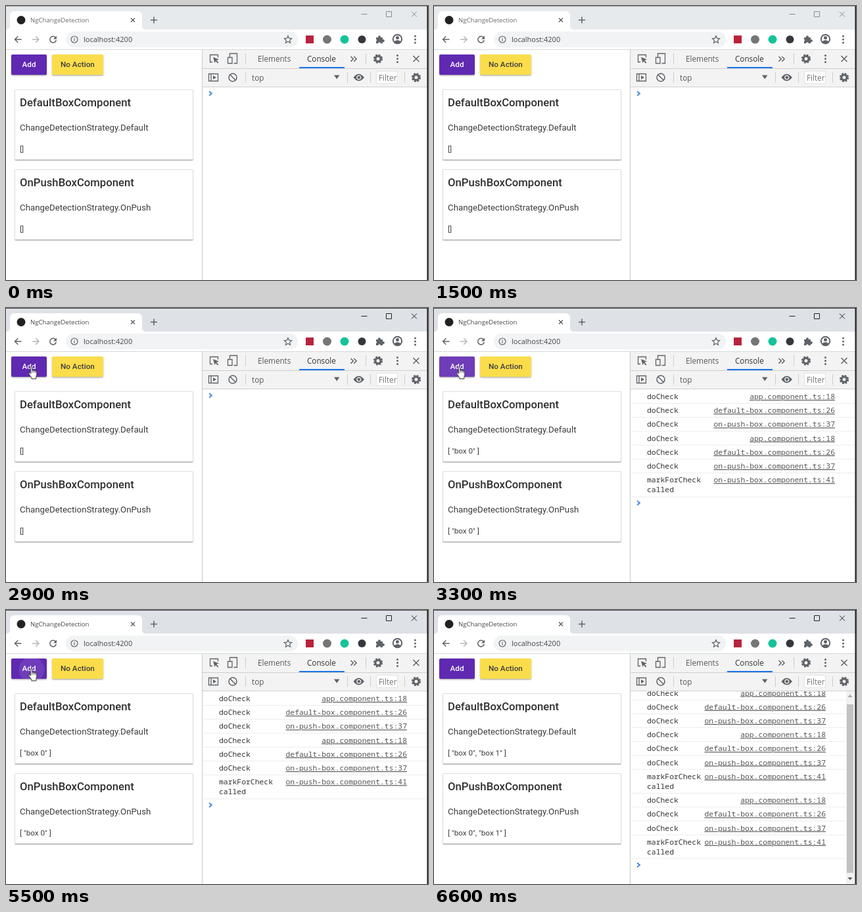
Animation of 642x418 px, one loop 6.7 s. Source, as an HTML page:

```html
<!DOCTYPE html>
<html lang="en">
<head>
<meta charset="utf-8">
<title>Change detection demo</title>
<style>
html, body { margin: 0; width: 642px; height: 418px; overflow: hidden; background: #fff; }
body { position: relative; }
svg { position: absolute; left: 0; top: 0; }
text { white-space: pre; }

.card, .btn { position: absolute; box-sizing: border-box; }
.card {
  left: 13px; width: 272px; height: 108px; background: #fff;
  border: 1px solid #dedede; border-bottom-color: #c4c4c4; border-radius: 2px;
  box-shadow: 0 1px 1px rgba(0,0,0,.28);
}
.btn {
  top: 74px; height: 31px; overflow: hidden; border-radius: 2px;
  box-shadow: 0 1.6px 1.6px rgba(0,0,0,.22), 0 .8px 3px rgba(0,0,0,.14);
}
.add { left: 8px; width: 54px; background: #6029b2; }
.noop { left: 70px; width: 78px; background: #fbdd4b; }
.ripple {
  position: absolute; left: -5px; top: -19px; width: 72px; height: 72px;
  border-radius: 50%; background: #fff; opacity: 0;
  animation: ripple 6.7s linear infinite;
}

.page { font-family: Roboto, sans-serif; fill: #3c3c3c; }
.head { font-size: 16.7px; font-weight: 500; fill: #303030; }
.body { font-size: 13.27px; }
.json { font-size: 11.7px; }
.label { font-size: 11.7px; font-weight: 500; }
.ui { font-family: "Open Sans", "Noto Sans", sans-serif; font-size: 11.7px; fill: #55585c; }
.mono { font-family: "Noto Sans Mono", "DejaVu Sans Mono", monospace; font-size: 11.4px; fill: #333; }
.link { text-anchor: end; text-decoration: underline; fill: #555; }
.icon { fill: none; stroke: #5f6368; stroke-width: 1.5; }
.solid { fill: #5f6368; }
.sep { stroke: #ccc; }

.strip, .frame, .controls, .tab, .none, .one, .from1, .two, .list, .link, .prompt, .cursor {
  animation: 6.7s step-end infinite;
}
.strip { animation-name: strip; }
.frame { animation-name: frame; }
.controls { animation-name: controls; }
.tab { animation-name: tab; }
.none { animation-name: none-yet; }
.one { animation-name: one-box; }
.from1 { animation-name: from1; }
.two { animation-name: from2; }
.list { animation-name: scroll; }
.link { animation-name: narrow; }
.prompt { animation-name: prompt; }
.cursor { animation-name: cursor; }

@keyframes strip { 0% { fill: #e7eaed; } 43.2%, 100% { fill: #dee1e6; } }
@keyframes frame { 0% { fill: #a2a4a7; } 43.2%, 100% { fill: #4a4c4f; } }
@keyframes controls { 0% { stroke: #898b8f; } 43.2%, 100% { stroke: #222; } }
@keyframes tab { 0% { fill: #686b70; } 43.2%, 100% { fill: #45484c; } }
@keyframes none-yet { 0% { visibility: visible; } 46.2%, 100% { visibility: hidden; } }
@keyframes one-box { 0% { visibility: hidden; } 46.2% { visibility: visible; } 83.5%, 100% { visibility: hidden; } }
@keyframes from1 { 0% { visibility: hidden; } 46.2%, 100% { visibility: visible; } }
@keyframes from2 { 0% { visibility: hidden; } 83.5%, 100% { visibility: visible; } }
@keyframes scroll { 0% { transform: none; } 83.5%, 100% { transform: translateY(-8.5px); } }
@keyframes narrow { 0% { transform: none; } 83.5%, 100% { transform: translateX(-14px); } }
@keyframes prompt {
  0% { transform: translateY(133.5px); }
  46.2% { transform: translateY(297.5px); }
  83.5%, 100% { transform: translateY(397.5px); }
}
@keyframes cursor {
  0% { visibility: hidden; transform: translate(19px, 99px); }
  25.3% { visibility: visible; transform: translate(19px, 99px); }
  26.8% { visibility: visible; transform: translate(35px, 93px); }
  28.3% { visibility: visible; transform: translate(38px, 90.5px); }
  31.3% { visibility: visible; transform: translate(33.5px, 88.5px); }
  74.6% { visibility: visible; transform: translate(33.5px, 89.5px); }
  77.6% { visibility: visible; transform: translate(33.5px, 88.5px); }
  97% { visibility: visible; transform: translate(19px, 99px); }
  98.5%, 100% { visibility: hidden; transform: translate(19px, 99px); }
}
@keyframes ripple {
  0%, 43.2% { transform: scale(0); opacity: 0; }
  43.21% { transform: scale(0); opacity: .1; animation-timing-function: cubic-bezier(0,0,.2,1); }
  50% { transform: scale(1); opacity: .1; }
  57% { transform: scale(1); opacity: 0; }
  57.01%, 80.6% { transform: scale(0); opacity: 0; }
  80.61% { transform: scale(0); opacity: .1; animation-timing-function: cubic-bezier(0,0,.2,1); }
  87.3% { transform: scale(1); opacity: .1; }
  92.5%, 100% { transform: scale(1); opacity: 0; }
}
</style>
</head>
<body>
<div class="btn add"><div class="ripple"></div></div>
<div class="btn noop"></div>
<div class="card" style="top:127px"></div>
<div class="card" style="top:249px"></div>

<svg width="642" height="418" viewBox="0 0 642 418">
  <defs>
    <clipPath id="pane"><rect x="300" y="124" width="342" height="294"/></clipPath>
    <g id="gear">
      <circle r="5.6" fill="none" stroke="#5f6368" stroke-width="3" stroke-dasharray="2.7 1.698"/>
      <circle r="4" fill="none" stroke="#5f6368" stroke-width="3"/>
    </g>
    <g id="dots" class="solid"><circle cy="-5" r="1.5"/><circle r="1.5"/><circle cy="5" r="1.5"/></g>
  </defs>

  <!-- tab strip -->
  <rect class="strip" width="642" height="36"/>
  <rect class="frame" width="642" height="1"/>
  <path fill="#fff" d="M0 36Q6 36 6 30V15Q6 8 13 8H200Q207 8 207 15V30Q207 36 213 36H642V66H0Z"/>
  <circle cx="23" cy="21.5" r="6.5" fill="#222"/>
  <text class="ui tab" x="37" y="25" style="font-size:9.6px">NgChangeDetection</text>
  <path class="icon" stroke-width="1.2" d="M190 18.500l6 6m0-6l-6 6M220 21.500h10m-5-5v10"/>
  <path class="controls" fill="none" d="M540.500 12.500h9M578.500 8.500h8v8h-8zM617 8.500l8 8m0-8l-8 8"/>

  <!-- address bar -->
  <path class="icon" d="M23.500 51H13.500m4.800-4.800L13.500 51l4.800 4.800"/>
  <path class="icon" style="stroke:#b4b7bb" d="M40 51h10m-4.800-4.800L50 51l-4.800 4.800"/>
  <path class="icon" d="M75.300 48a4.800 4.800 0 1 0 1 4"/>
  <path class="solid" d="M77 45.500v5h-5z"/>
  <rect x="91" y="39" width="353" height="24" rx="12" fill="#f1f3f4"/>
  <circle class="icon" cx="104" cy="51" r="5" style="stroke-width:1.2"/>
  <path class="icon" style="stroke-width:1.2" d="M104 50.200v3.300m0-5.300v1.200"/>
  <text class="ui" x="118" y="55" style="font-size:11px;fill:#444">localhost:4200</text>
  <path class="icon" style="stroke-width:1.2" d="M429 45.500l1.600 3.700 4 .4-3 2.700.9 4-3.500-2.100-3.500 2.100.9-4-3-2.700 4-.4z"/>
  <rect x="456" y="45" width="12" height="12" fill="#b8233d"/>
  <circle cx="488.500" cy="51" r="6.500" fill="#747678"/>
  <circle cx="515" cy="51" r="6.500" fill="#15c39a"/>
  <circle cx="541.500" cy="51" r="6" fill="#34373b"/>
  <path class="solid" d="M563 48h3.200a2 2 0 1 1 3.600 0h3.200v3.200a2 2 0 1 1 0 3.600V57h-3.200a1.800 1.800 0 0 0-3.600 0H563v-3.200a1.800 1.800 0 0 0 0-3.200z"/>
  <circle class="icon" cx="595.500" cy="50.500" r="6.700" style="stroke-width:2"/>
  <circle class="solid" cx="595.500" cy="48.500" r="2.500"/>
  <path class="solid" d="M590 54.500q5.500-5 11 0-5.500 5-11 0z"/>
  <use href="#dots" x="622.500" y="51"/>
  <path d="M0 66.500H642" stroke="#d5d7da"/>

  <!-- app -->
  <g class="page">
    <text class="label" x="24.500" y="93" fill="#fff">Add</text>
    <text class="label" x="83" y="93">No Action</text>
    <g id="cards"></g>
  </g>

  <!-- developer tools -->
  <rect x="299" y="67" width="343" height="56" fill="#f3f3f3"/>
  <path d="M298.500 67V418" stroke="#c8c8c8"/>
  <path d="M299 95.500H642M299 123.500H642" stroke="#cfcfcf"/>
  <rect x="446" y="93" width="69" height="2" fill="#1a73e8"/>
  <path class="sep" d="M364.500 72v17M547.500 72v17M364.500 101v16M519.500 101v16M554.500 101v16M606.500 101v16"/>
  <path class="icon" style="stroke-width:1.3" d="M314 85.500h-3.500v-11h12v4"/>
  <path class="solid" d="M315 78l9 3.500-3.700 1.300 3 3.400-1.300 1.200-3-3.400-1.500 3z"/>
  <path class="icon" style="stroke-width:1.3" d="M340.500 78v-5.500h11v15h-5M337.500 78.500h6.500v9h-6.500z"/>
  <text class="ui" x="383" y="85">Elements</text>
  <text class="ui" x="458" y="85" style="fill:#333">Console</text>
  <path class="icon" d="M524.500 77l3.800 3.800-3.800 3.800m4.800-7.600l3.800 3.800-3.800 3.800"/>
  <use href="#gear" x="566" y="80.500"/>
  <use href="#dots" x="595.500" y="80.500"/>
  <path class="icon" d="M619.500 76l9 9m0-9l-9 9"/>
  <path class="icon" style="stroke-width:1.3" d="M308.500 103.500h14v11h-14zM312 103.500v11"/>
  <path class="solid" d="M315 106l5 3-5 3z"/>
  <path class="icon" d="M351 109a6 6 0 1 1-12 0 6 6 0 1 1 12 0M340.800 104.800l8.500 8.500"/>
  <text class="ui" x="374" y="113.500">top</text>
  <path class="solid" d="M499 105.500h8.500l-4.250 6z"/>
  <path class="solid" d="M528.500 109q8-10.500 16.500 0-8.500 10.500-16.500 0z"/>
  <circle cx="536.800" cy="109" r="2.900" fill="#5f6368" stroke="#f3f3f3" stroke-width="1.300"/>
  <rect x="563.500" y="99.500" width="32" height="19" fill="#fff" stroke="#e2e2e2"/>
  <text class="ui" x="567" y="114" style="fill:#757575">Filter</text>
  <use href="#gear" x="624" y="109"/>

  <g clip-path="url(#pane)">
    <g class="list">
      <g id="rows"></g>
      <path class="prompt" d="M309-3.300l4 3.300-4 3.300" fill="none" stroke="#3b82e0" stroke-width="1.800"/>
    </g>
    <g class="two">
      <rect x="627" y="124" width="13" height="294" fill="#f1f1f1"/>
      <rect x="628" y="144" width="10" height="257" fill="#c1c1c1"/>
      <path fill="#a3a3a3" d="M629.500 133l3.500-4 3.500 4z"/>
      <path fill="#555" d="M629.500 408l3.500 4 3.500-4z"/>
    </g>
  </g>
  <rect x="640.500" width="1.500" height="418" fill="#1c1c1c"/>

  <g class="cursor">
    <path fill="#fff" stroke="#111" stroke-width=".9" d="M4 2c0-1.800 2.500-1.800 2.500 0v5c.3-1 2.300-.8 2.400.3.500-.8 2.200-.5 2.300.5.600-.7 2-.3 2 1v5c0 1.500-1 2.500-1 3.700v2H5.500V18C4 16 2.500 14 1 11.500c-.8-1.400.6-2.300 1.700-1.300L4 11.600z"/>
    <path fill="none" stroke="#111" stroke-width=".7" d="M6.500 7v3M8.900 7.300v3M11.200 7.800v2.700"/>
  </g>
</svg>

<script>
const byId = id => document.getElementById(id);
const text = (cls, x, y, str) => `<text class="${cls}" x="${x}" y="${y}">${str}</text>`;

const card = (name, y) =>
  text('head', 21, y + 26, name + 'BoxComponent') +
  text('body', 21, y + 63, 'ChangeDetectionStrategy.' + name) +
  text('json none', 21, y + 95, '[]') +
  text('json one', 21, y + 95, '[ "box 0" ]') +
  text('json two', 21, y + 95, '[ "box 0", "box 1" ]');
byId('cards').innerHTML = card('Default', 127) + card('OnPush', 249);

const checks = ['app.component.ts:18', 'default-box.component.ts:26', 'on-push-box.component.ts:37'];
const mark = 'on-push-box.component.ts:41';
let y = 135;

function row(file) {
  const marked = file === mark;
  const height = marked ? 36.4 : 21.2;
  const out = text('mono', 324, y + 4, marked ? 'markForCheck' : 'doCheck') +
    (marked ? text('mono', 324, y + 19, 'called') : '') +
    text('mono link', 610, y + 4, file) +
    `<path d="M300 ${y + height - 10.6}H640" stroke="#ececec"/>`;
  y += height;
  return out;
}
const group = (cls, files) => `<g class="${cls}">${files.map(row).join('')}</g>`;
byId('rows').innerHTML =
  group('from1', [...checks, ...checks, mark]) + group('two', [...checks, mark]);
</script>
</body>
</html>
```
